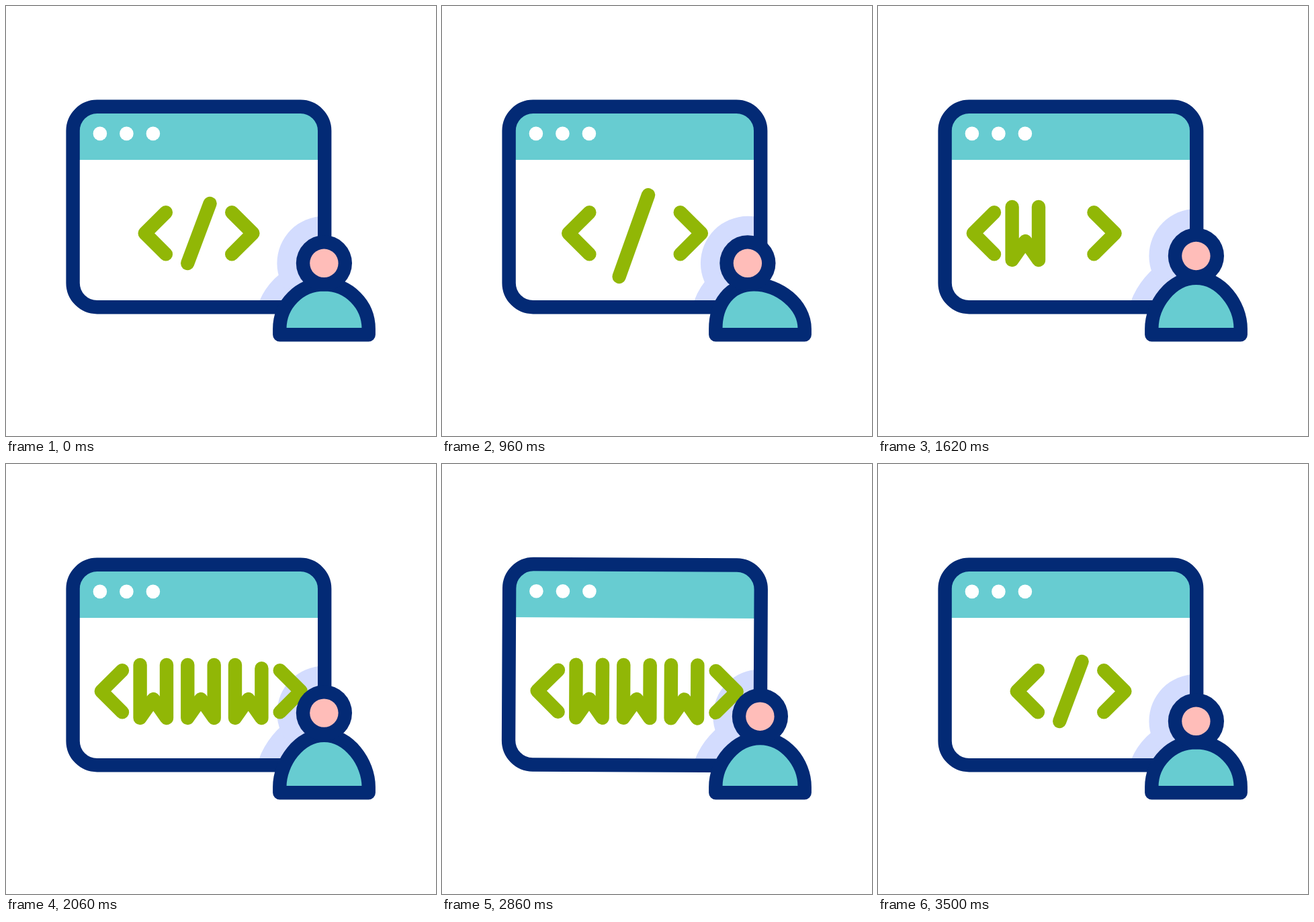
Animation of 640x640 px, one loop 3600 ms. Source, as an HTML page with a canvas:

```html
<!DOCTYPE html>
<html>
<head>
<meta charset="utf-8">
<style>
html, body { margin: 0; width: 100%; height: 100%; overflow: hidden; background: #fff; }
canvas { display: block; width: 640px; height: 640px; }
</style>
</head>
<body>
<canvas id="stage" width="640" height="640"></canvas>
<script>
const ctx = document.getElementById('stage').getContext('2d');
const LOOP = 3600, LINE = 20.4, HALO = 57;
const NAVY = '#032a75', TEAL = '#67ccd1', GREEN = '#91b706', PINK = '#ffbdb9', LILAC = '#d3dcfe';
const WHITE = [255, 255, 255], YELLOW = [255, 203, 82];

const lerp = (a, b, p) => a + (b - a) * p;
const ease = (t, from, to) => {
  const p = Math.min(1, Math.max(0, (t - from) / (to - from)));
  return p * p * (3 - 2 * p);
};
const pulse = (t, from, to) => {
  const mid = (from + to) / 2;
  return t < mid ? ease(t, from, mid) : 1 - ease(t, mid, to);
};
// Eased value through [time, value] keys.
function track(t, keys) {
  let value = keys[0][1];
  for (let i = 1; i < keys.length; i++) {
    const [t0, v0] = keys[i - 1], [t1, v1] = keys[i];
    if (t >= t0) value = lerp(v0, v1, ease(t, t0, t1));
  }
  return value;
}

function polyline(points, width = LINE) {
  ctx.beginPath();
  points.forEach(([x, y]) => ctx.lineTo(x, y));
  ctx.lineWidth = width;
  ctx.stroke();
}
function disc(x, y, r, color) {
  ctx.beginPath();
  ctx.arc(x, y, r, 0, Math.PI * 2);
  ctx.fillStyle = color;
  ctx.fill();
}
function windowPath() {
  ctx.beginPath();
  ctx.roundRect(99.6, 149.8, 374.6, 298.4, 36);
}
function bodyPath(dx, dy) {
  const left = 407.3, right = 539.7, base = 489.3, side = 480.5, k = 36.6;
  const x = 473.5 + dx / 2, y = 414.3 + dy * 0.87;
  ctx.beginPath();
  ctx.moveTo(left, base);
  ctx.lineTo(left, side);
  ctx.bezierCurveTo(left, side - k, x - k, y, x, y);
  ctx.bezierCurveTo(x + k, y, right, side - k, right, side);
  ctx.lineTo(right, base);
  ctx.closePath();
}
function tilt(angle) {
  ctx.translate(286.9, 299);
  ctx.rotate(angle);
  ctx.translate(-286.9, -299);
}

function drawDots(t) {
  const glow = pulse(t, 100, 760) + pulse(t, 960, 1620);
  const color = `rgb(${WHITE.map((c, i) => Math.round(lerp(c, YELLOW[i], Math.min(1, glow * 1.1))))})`;
  for (let i = 0; i < 3; i++) disc(139.9 + i * 39.5, 189.9, 10.3 + 1.5 * glow, color);
}

function drawBracket(x, dir) {
  polyline([[x, 307.3], [x + dir * 31.2, 338.3], [x, 369.4]]);
}
function drawSlash(spread, size) {
  if (size <= 0) return;
  const ends = [
    [303.5 + 0.19 * spread, 294 - 0.69 * spread],
    [270.2 - 0.36 * spread, 383 + 1.08 * spread]
  ];
  polyline(ends.map(([x, y]) => [lerp(286.8, x, size), lerp(338.5, y, size)]), LINE * Math.min(1, size * 4));
}
function drawLetter(x, shown) {
  if (shown <= 0) return;
  const length = 227;
  if (shown < 1) ctx.setLineDash([length * shown, length * 2]);
  polyline([[x, 299], [x, 378], [x + 19.7, 350], [x + 39.4, 378], [x + 39.4, 299]]);
  ctx.setLineDash([]);
}
function drawCode(t) {
  const left = track(t, [[0, 237.9], [636, 219.4], [1000, 219.4], [1250, 173], [3100, 173], [3440, 237.9]]);
  const right = track(t, [[0, 336.2], [636, 354.7], [1000, 354.7], [1300, 266.5], [1440, 266.5],
    [1700, 337], [1760, 337], [2000, 407.7], [3100, 407.7], [3440, 336.2]]);
  const spread = 18.5 * ease(t, 0, 636) * (1 - ease(t, 1000, 1236));
  const slash = 1 - ease(t, 1000, 1220) + ease(t, 3200, 3460);
  ctx.strokeStyle = GREEN;
  drawBracket(left, -1);
  drawBracket(right, 1);
  drawSlash(spread, slash);
  [1300, 1640, 1880].forEach((start, i) => {
    const gone = 3060 - i * 60;
    drawLetter(199.6 + i * 70.7, ease(t, start, start + 200) - ease(t, gone, gone + 140));
  });
}

function draw(t) {
  const angle = track(t, [[0, 0], [2100, 0], [2470, 4], [3290, -4], [3500, 0]]) * Math.PI / 180;
  const dx = track(t, [[0, 0], [636, -18.5], [1000, -18.5], [1236, 0]]);
  let dy = 0;
  for (let i = 0; i < 3; i++) dy -= 13.8 * pulse(t, 1236 + i * 592, 1828 + i * 592);
  const headX = 473.4 + dx, headY = 382.8 + dy;

  ctx.fillStyle = '#fff';
  ctx.fillRect(0, 0, 640, 640);
  ctx.lineCap = ctx.lineJoin = 'round';

  // Window interior; the halo behind the person stays upright.
  ctx.save();
  tilt(angle);
  windowPath();
  ctx.clip();
  ctx.fillStyle = TEAL;
  ctx.fillRect(90, 140, 394, 89);
  drawDots(t);
  tilt(-angle);
  ctx.fillStyle = ctx.strokeStyle = LILAC;
  bodyPath(dx, dy);
  ctx.lineWidth = LINE + HALO;
  ctx.fill();
  ctx.stroke();
  disc(headX, headY, 70, LILAC);
  ctx.restore();

  ctx.save();
  tilt(angle);
  drawCode(t);
  windowPath();
  ctx.lineWidth = LINE;
  ctx.strokeStyle = NAVY;
  ctx.stroke();
  ctx.restore();

  bodyPath(dx, dy);
  ctx.fillStyle = TEAL;
  ctx.fill();
  ctx.strokeStyle = NAVY;
  ctx.lineWidth = LINE;
  ctx.stroke();
  disc(headX, headY, 41.6, NAVY);
  disc(headX, headY, 21.2, PINK);
}

const start = performance.now();
function frame() {
  draw((performance.now() - start) % LOOP);
  requestAnimationFrame(frame);
}
frame();
</script>
</body>
</html>
```
